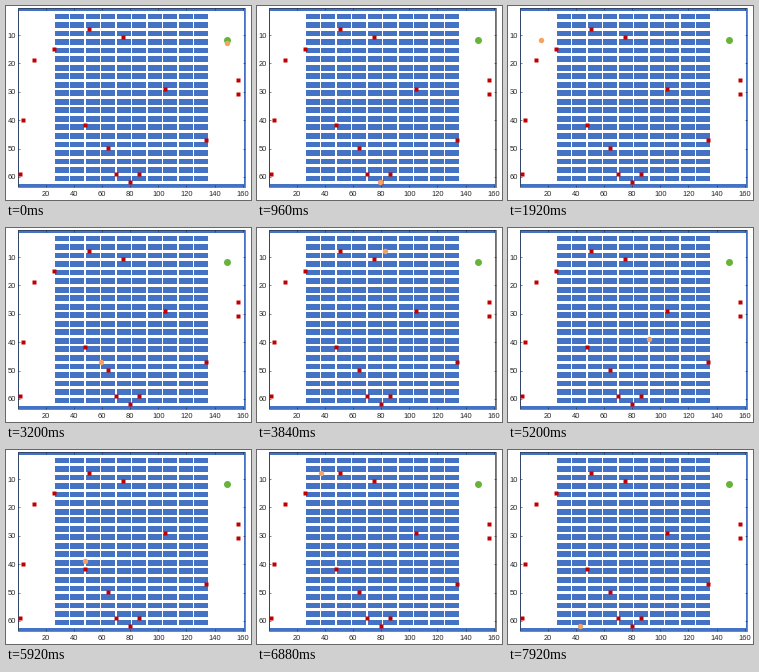
Animation of 245x194 px, one loop 8 s. Source, as a matplotlib script:

```python
import numpy as np
import matplotlib.pyplot as plt
from matplotlib.animation import FuncAnimation
from matplotlib.colors import ListedColormap

WIDTH, HEIGHT, DPI = 245, 194, 100
COLS, ROWS = 161, 63
FRAMES, INTERVAL, CELLS_PER_FRAME = 100, 80, 10
BLUE, RED, GREEN, ORANGE, INK = "#4472c4", "#c00000", "#68b43a", "#f4a460", "#262626"

HOME, HUB, WEST, SOUTH = (149, 12), (51, 8), (12, 19), (80, 62)
DOCK, MIDDLE, EAST = (86, 59), (105, 29), (157, 31)
NORTHWEST, CORNER = (26, 15), (2, 59)
STATIONS = [HUB, WEST, SOUTH, DOCK, MIDDLE, EAST, NORTHWEST, CORNER, (4, 40),
            (75, 11), (48, 42), (64, 50), (70, 59), (134, 47), (157, 26)]

# A repeated stop is a pause of one step.
STOPS = [HOME, DOCK, SOUTH, SOUTH, (12, 62), WEST, (15, 12), HUB, HUB, SOUTH,
         HUB, HUB, MIDDLE, EAST, DOCK, SOUTH, (48, 38), (26, 19), WEST, HUB,
         NORTHWEST, CORNER, (2, 62), SOUTH]


def px(x):
    return 11.6 + 1.407 * np.asarray(x)


def py(y):
    return 0.6 + 2.84 * np.asarray(y)


def warehouse():
    """Walls around the floor, shelves two cells deep and ten cells long."""
    y, x = np.mgrid[1:ROWS + 1, 1:COLS + 1]
    wall = (x == 1) | (x == COLS) | (y == 1) | (y == ROWS)
    shelf = (x > 26) & (x < 136) & ((x - 27) % 11 < 10)
    shelf &= (y > 2) & (y < 62) & (y % 3 < 2)
    return (wall | shelf).astype(int)


def leg(start, goal):
    """Take the nearest aisle row to the last cross aisle before the goal."""
    (x0, y0), (x1, y1) = start, goal
    row = y0
    while row != y1 and row % 3 != 2:
        row += 1 if y1 > y0 else -1
    crossings = [c for c in range(26, 137, 11) if min(x0, x1) <= c <= max(x0, x1)]
    col = min(crossings, key=lambda c: abs(c - x1), default=x0)
    corners = [start, (x0, row), (col, row), (col, y1), goal]
    cells = []
    for (xa, ya), (xb, yb) in zip(corners, corners[1:]):
        steps = abs(xb - xa) + abs(yb - ya)
        cells += [(xa + (xb - xa) * k / steps, ya + (yb - ya) * k / steps)
                  for k in range(1, steps + 1)]
    return cells or [goal]


path = [HOME]
for start, goal in zip(STOPS, STOPS[1:]):
    path += leg(start, goal)

fig = plt.figure(figsize=(WIDTH / DPI, HEIGHT / DPI), dpi=DPI, facecolor="white")
ax = fig.add_axes([0, 0, 1, 1])
ax.axis("off")

left, right = px([0.5, COLS + 0.5])
top, bottom = py([0.5, ROWS + 0.5])
ax.imshow(warehouse(), cmap=ListedColormap(["white", BLUE]), aspect="auto",
          interpolation="nearest", extent=(left, right, bottom, top))
ax.set(xlim=(0, WIDTH), ylim=(HEIGHT, 0))


def line(xs, ys):
    ax.plot(xs, ys, color=INK, lw=0.4, solid_capstyle="butt")


def label(x, y, text, ha):
    ax.text(x, y, text, ha=ha, va="center_baseline", color=INK,
            family="Liberation Sans", size=7.5 * 72 / DPI)


def spots(cells):
    """Marker centres, which sit slightly above the cell centres."""
    x, y = np.transpose(cells)
    return px(x), py(y) - 0.4


def dots(cells, marker, size, color):
    return ax.plot(*spots(cells), marker, ms=size * 72 / DPI, mfc=color,
                   mec="none", ls="none", zorder=3)[0]


line([left, right, right, left, left], [top, top, bottom, bottom, top])
for value in range(20, 161, 20):
    x = px(value)
    line([x, x], [bottom, bottom - 2])
    line([x, x], [top, top + 2])
    label(x, 188, value, "center")
for value in range(10, 61, 10):
    y = py(value)
    line([left, left + 2], [y, y])
    line([right, right - 2], [y, y])
    label(left - 2.2, y, value, "right")

dots(STATIONS, "s", 4.2, RED)
dots([HOME], "o", 7, GREEN)
robot = dots([HOME], "o", 5.4, ORANGE)


def update(frame):
    robot.set_data(*spots([path[CELLS_PER_FRAME * frame + 1]]))
    return [robot]


anim = FuncAnimation(fig, update, frames=FRAMES, interval=INTERVAL,
                     repeat=True, repeat_delay=0)
plt.show()
```
